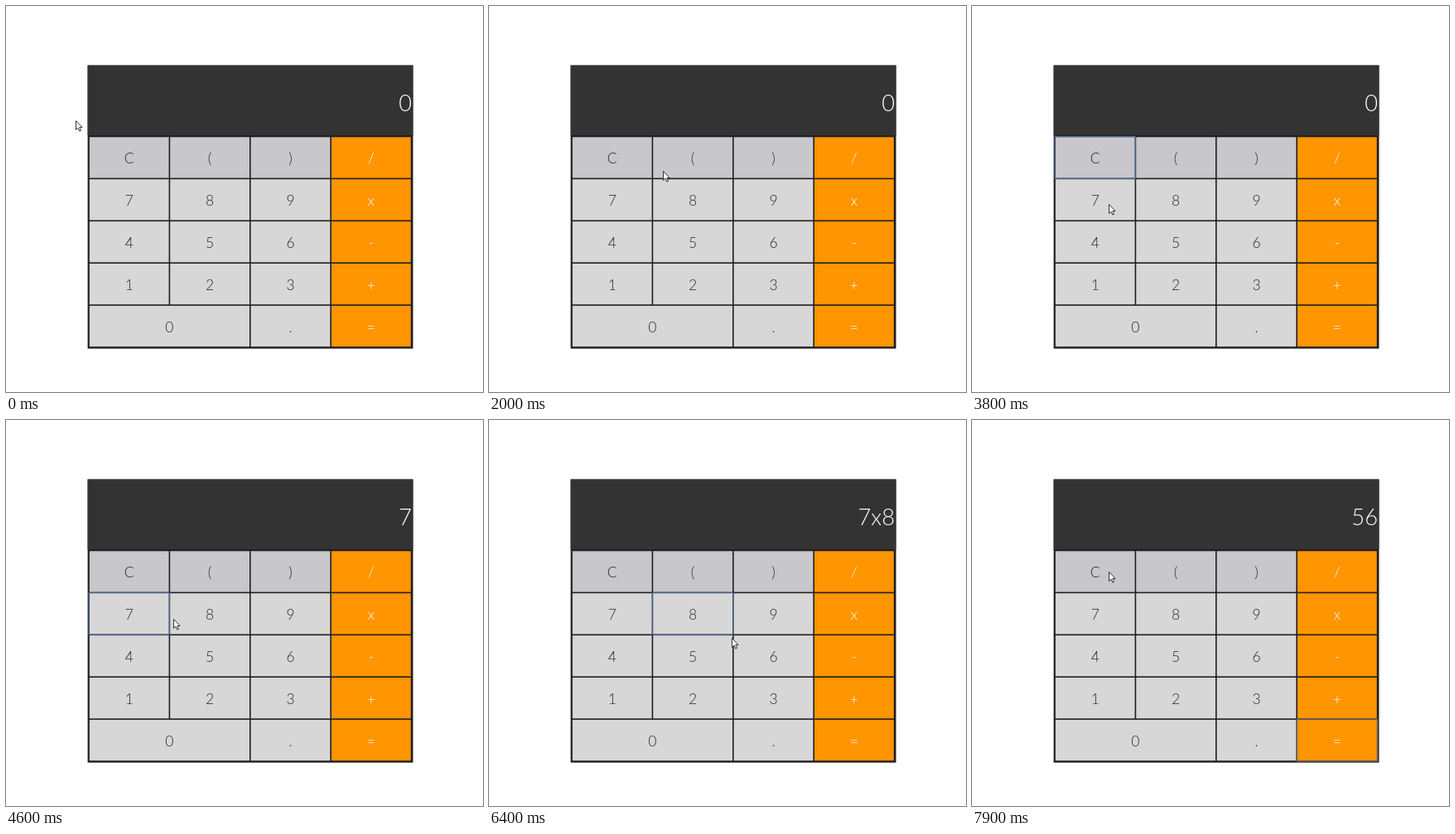
An HTML page with a canvas for the animation above (8 s loop, 576 px wide and 466 px high).

```html
<!DOCTYPE html>
<html lang="en">
<head>
<meta charset="utf-8">
<title>Calculator</title>
<style>
  html, body { margin: 0; width: 100%; height: 100%; overflow: hidden; background: #fff; }
  canvas { display: block; }
</style>
</head>
<body>
<canvas id="stage" width="576" height="466"></canvas>
<script>
const ctx = document.getElementById('stage').getContext('2d');
const LOOP = 8000, STEP = 100;
const LEFT = 100, TOP = 157.5, CELL_W = 97.4, CELL_H = 50.9;
const LINE = 1.6, TRAVEL = 850;

// A repeated label is one wide key.
const layout = ['C()/', '789x', '456-', '123+', '00.='];

// Each stop of the pointer: when it acts, where it rests, and what it presses.
const stops = [
  { time: 500, x: 84, y: 138 },
  { time: 2000, x: 210, y: 199 },
  { time: 2500, x: 150, y: 200, key: 'C', display: '0' },
  { time: 4300, x: 165, y: 239, key: '7', display: '7' },
  { time: 5400, x: 426, y: 244, key: 'x', display: '7x' },
  { time: 6100, x: 262, y: 241, key: '8', display: '7x8' },
  { time: 7100, x: 486, y: 397, key: '=', display: '56' },
  { time: 7800, x: 165, y: 183 }
];

// The pointer leaves soon after one stop and reaches the next just before acting.
function pointerAt(t) {
  let { x, y } = stops[0];
  for (let i = 1; i < stops.length; i++) {
    const leave = stops[i - 1].time + 100;
    const duration = Math.min(TRAVEL, stops[i].time - 50 - leave);
    const u = Math.min(1, Math.max(0, (t - leave) / duration));
    const eased = u * u * (3 - 2 * u);
    x += (stops[i].x - x) * eased;
    y += (stops[i].y - y) * eased;
  }
  return [x, y];
}

function rect(color, x, y, w, h) {
  ctx.fillStyle = color;
  ctx.fillRect(x, y, w, h);
}

function text(label, x, y, size, align, color) {
  ctx.font = `300 ${size}px Lato, sans-serif`;
  ctx.textAlign = align;
  ctx.fillStyle = color;
  ctx.fillText(label, x, y);
}

function drawKey(label, row, col, span, focused) {
  const x = LEFT + col * CELL_W, y = TOP + row * CELL_H, w = CELL_W * span;
  const orange = col === 3;
  const fill = orange ? '#ff9500' : row === 0 ? '#c7c7cc' : '#d7d7d7';
  rect(fill, x + LINE / 2, y + LINE / 2, w - LINE, CELL_H - LINE);
  text(label, x + w / 2, y + 32.5, 17.5, 'center', orange ? '#fff' : '#2b2b2b');
  if (focused) {
    ctx.strokeStyle = orange ? '#777b86' : '#4d69a0';
    ctx.lineWidth = 1;
    ctx.strokeRect(x, y, w, CELL_H);
  }
}

function drawKeys(focus) {
  layout.forEach((line, row) => [...line].forEach((label, col) => {
    if (label === line[col - 1]) return;
    const span = label === line[col + 1] ? 2 : 1;
    drawKey(label, row, col, span, label === focus);
  }));
}

function drawPointer(x, y) {
  ctx.save();
  ctx.translate(Math.round(x) + 0.5, Math.round(y) + 0.5);
  const arrow = new Path2D('M0 0V11L2.5 8.7L4.3 12.6L6 11.8L4.3 8H7.6Z');
  ctx.fillStyle = '#fff';
  ctx.strokeStyle = '#333';
  ctx.lineWidth = 1;
  ctx.fill(arrow);
  ctx.stroke(arrow);
  ctx.restore();
}

function draw(t) {
  const pressed = stops.filter(s => s.key && s.time <= t).pop();
  rect('#fff', 0, 0, 576, 466);
  rect('#1e1e20', 98.6, 71.6, 392.9, 342);
  rect('#333', 98.6, 71.6, 392.9, 84.6);
  text(pressed ? pressed.display : '0', 490, 127, 27.3, 'right', '#fff');
  drawKeys(pressed && pressed.key);
  drawPointer(...pointerAt(t));
}

function tick(now) {
  draw(Math.floor((now % LOOP) / STEP) * STEP);
  requestAnimationFrame(tick);
}
requestAnimationFrame(tick);
</script>
</body>
</html>
```
